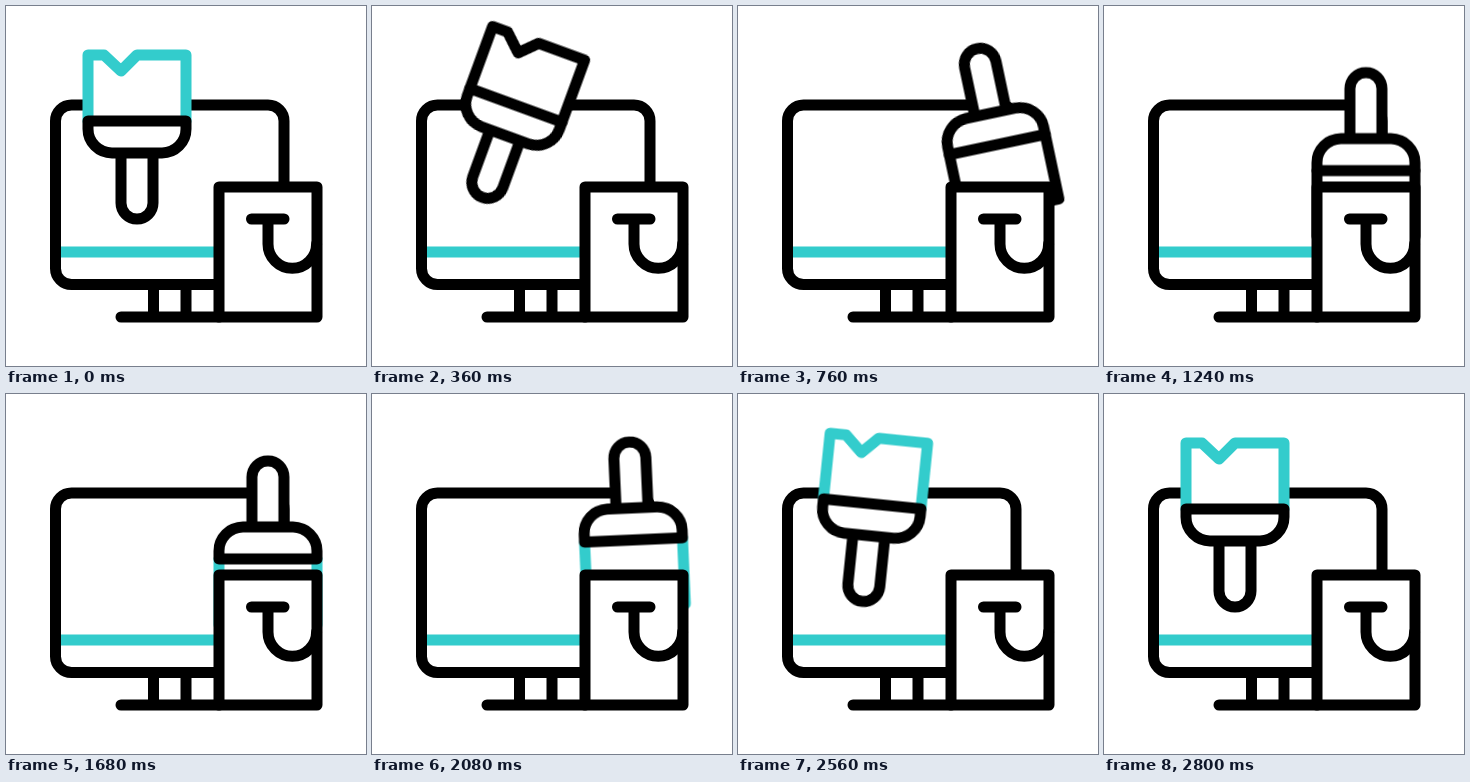
Animation, 360 px wide and 360 px high, one loop 3000 ms. Source, as an HTML page without scripts:

```html
<!DOCTYPE html>
<html lang="en">
<head>
<meta charset="utf-8">
<title>Paint brush and screen</title>
<style>
  html, body { margin: 0; height: 100%; overflow: hidden; background: #fff; }
  svg { display: block; width: 100%; height: 100%; }

  .line {
    fill: none;
    stroke: #000;
    stroke-width: 11;
    stroke-linecap: round;
    stroke-linejoin: round;
  }
  .solid { fill: #fff; }
  .flat { stroke-linecap: butt; }
  .paint { stroke: #3cc; }

  /* The brush swings over an arc, dips into the bucket and swings back. */
  .brush {
    transform-origin: 0 0;
    offset-path: path("M131 131C144 78 230 76 262 132");
    offset-rotate: 0deg;
    offset-anchor: 0 0;
    animation: swing 3s cubic-bezier(.3333, 0, .6667, 1) infinite;
  }
  @keyframes swing {
    0%, 7.67% { offset-distance: 0%; transform: rotate(0deg); translate: 0 0; }
    28.67% { offset-distance: 100%; transform: rotate(180deg); translate: 0 0; }
    49.07% { offset-distance: 100%; transform: rotate(180deg); translate: 0 24.5px; }
    68% { offset-distance: 100%; transform: rotate(180deg); translate: 0 0; }
    87.47%, 100% { offset-distance: 0%; transform: rotate(0deg); translate: 0 0; }
  }

  .bristles { animation: load 3s linear infinite; }
  @keyframes load {
    0%, 3.3% { stroke: #3cc; }
    8.6%, 49% { stroke: #000; }
    49.1%, 100% { stroke: #3cc; }
  }
</style>
</head>
<body>
<svg viewBox="0 0 360 360">
  <g class="line">
    <rect class="solid" x="49.5" y="99" width="228.5" height="179.5" rx="16"/>
    <path class="flat paint" d="M55 246H213"/>
    <path class="flat" d="M147.5 278V311M180 278V311"/>
    <path d="M115 311H213"/>
  </g>

  <g class="brush line">
    <path class="solid bristles" d="M-49-16V-82H-33L-16-66L0-82H49V-16"/>
    <path class="solid" d="M-16 16V66A16 16 0 0 0 16 66V16"/>
    <path class="solid" d="M-49-16H49V-8A24 24 0 0 1 25 16H-25A24 24 0 0 1-49-8Z"/>
  </g>

  <g class="line">
    <rect class="solid" x="213" y="181" width="98" height="130"/>
    <path d="M245.5 213H278M262 213V238A24.3 24.3 0 0 0 310.6 238"/>
  </g>
</svg>
</body>
</html>
```
